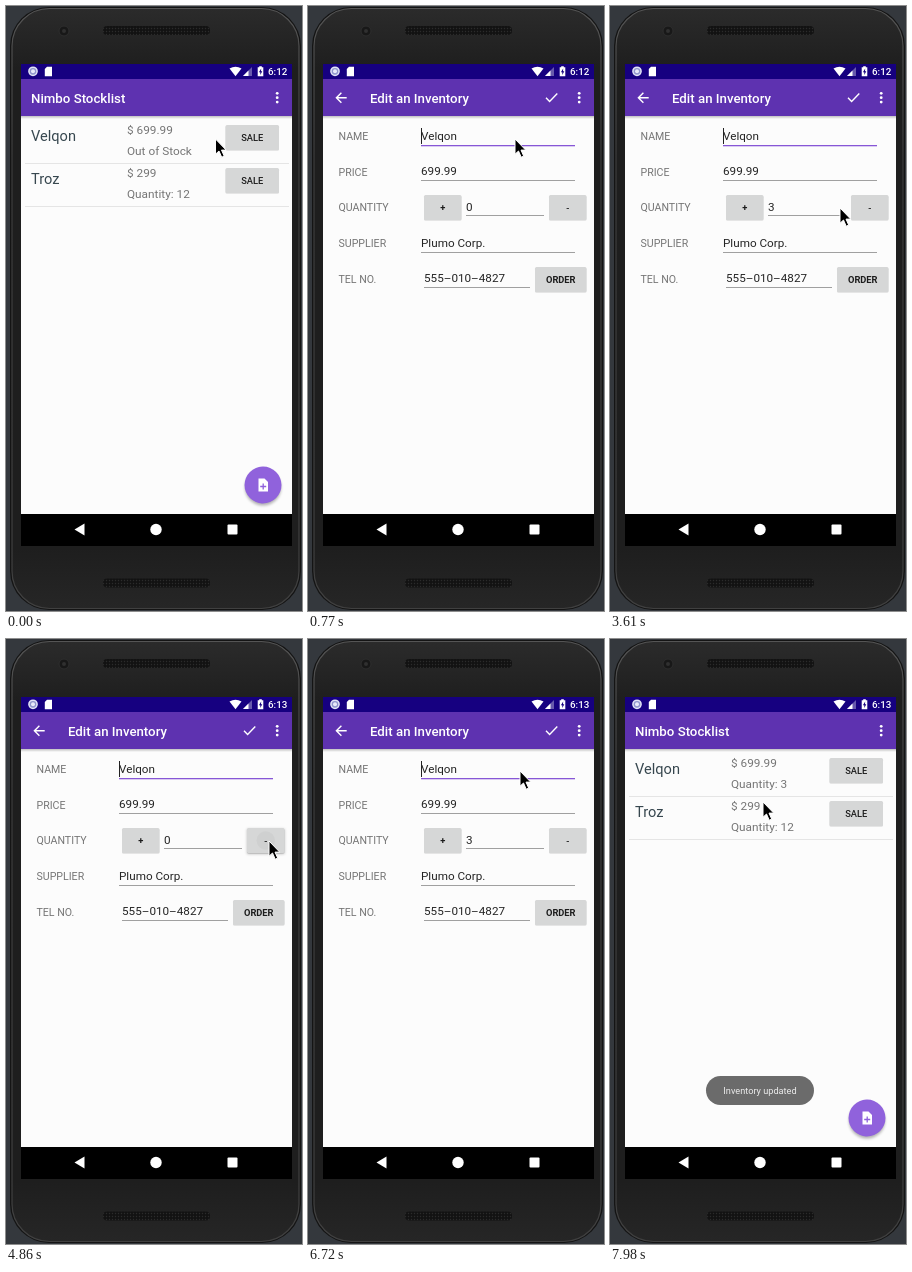
Animation, 296 px wide and 605 px high, one loop 8 s. Source, as an HTML page:

```html
<!DOCTYPE html>
<html lang="en">
<head>
<meta charset="utf-8">
<title>Stock app</title>
<style>
html, body { margin: 0; width: 100%; height: 100%; overflow: hidden; background: #34383d; }
svg { display: block; width: 296px; height: 605px; }
text { font-family: Roboto, "Noto Sans", sans-serif; white-space: pre; }
.med { font-weight: 500; }
</style>
</head>
<body>
<svg id="stage" viewBox="0 0 296 605">
  <defs>
    <linearGradient id="body" x2="0" y2="1">
      <stop offset="0" stop-color="#2b2b2b"/><stop offset=".1" stop-color="#1e1e1e"/>
      <stop offset=".9" stop-color="#1e1e1e"/><stop offset="1" stop-color="#262626"/>
    </linearGradient>
    <linearGradient id="rim" x2="0" y2="1">
      <stop offset="0" stop-color="#555"/><stop offset=".25" stop-color="#3c3c3c"/><stop offset="1" stop-color="#404040"/>
    </linearGradient>
    <linearGradient id="fade" x2="0" y2="1">
      <stop offset="0" stop-color="#000" stop-opacity=".24"/><stop offset="1" stop-color="#000" stop-opacity="0"/>
    </linearGradient>
    <pattern id="mesh" width="3" height="3" patternUnits="userSpaceOnUse">
      <rect width="3" height="3" fill="#121212"/><circle cx="1.5" cy="1.5" r=".7" fill="#2b2b2b"/>
    </pattern>
    <filter id="soft" x="-50%" y="-50%" width="200%" height="200%"><feGaussianBlur stdDeviation="1.6"/></filter>
    <clipPath id="screen"><rect x="15" y="58" width="271" height="482"/></clipPath>
  </defs>
  <rect width="296" height="605" fill="#34383d"/>
  <rect x="4" y="1" width="291" height="603" rx="39" fill="#141414"/>
  <rect x="6" y="2.5" width="287" height="600" rx="37.5" fill="url(#body)" stroke="url(#rim)" stroke-width="1.2"/>
  <circle cx="58" cy="25" r="5" fill="#181818" stroke="#2e2e2e"/>
  <circle cx="58" cy="25" r="2" fill="#303030"/>
  <rect x="97" y="20" width="107" height="9" rx="4" fill="url(#mesh)"/>
  <rect x="97" y="572.5" width="107" height="9" rx="4" fill="url(#mesh)"/>
  <g clip-path="url(#screen)">
    <rect x="15" y="58" width="271" height="482"/>
    <g id="list"></g>
    <g id="nav" fill="#fff">
      <path d="M68.5 523.5 78.5 517.5V529.5Z"/>
      <circle cx="150" cy="523.5" r="5.7"/>
      <rect x="221.5" y="518.5" width="10" height="10" rx="1"/>
    </g>
    <g id="edit"></g>
    <g id="status" fill="#fff">
      <circle cx="27" cy="65.3" r="4.1" fill="#8f95cc" stroke="#e2e4f6" stroke-width="1.5"/>
      <circle cx="27" cy="65.3" r="2" fill="#e8eafa"/>
      <path d="M41 60.7H46V70.3H38.8V63Z"/>
      <path d="M223.5 62.6Q229.5 58.8 235.5 62.6L229.5 70.3Z"/>
      <path d="M246 61V70H237Z" fill-opacity=".35"/>
      <path d="M242.5 64.5V70H237Z"/>
      <path d="M253.2 61.2V60.2H255.8V61.2H257.3V70.2H251.7V61.2Z"/>
      <path d="M255.2 62.5 252.9 66.3H254.3V69L256.3 65.2H255Z" fill="#160080"/>
    </g>
    <g id="toast">
      <rect x="96" y="437" width="108" height="29" rx="14.5" fill="#6b6b6b"/>
    </g>
  </g>
  <path id="mouse" d="M0 0V15.2L3.5 12 6.2 18.2 8.7 17.1 6 11.1H10.7Z" fill="#000" stroke="#fff" stroke-width="1" stroke-linejoin="round"/>
</svg>
<script>
const LOOP = 8000, BLINK_FROM = 1070, BLINK = 485;
const GREY = '#757575', INK = '#242424';
const $ = id => document.getElementById(id);

function add(parent, tag, attrs) {
  const el = document.createElementNS('http://www.w3.org/2000/svg', tag);
  for (const key in attrs) el.setAttribute(key, attrs[key]);
  return parent.appendChild(el);
}
function label(parent, x, y, str, size, fill, more = {}) {
  const el = add(parent, 'text', { x, y, 'font-size': size, fill, ...more });
  el.textContent = str;
  return el;
}
const rect = (parent, x, y, width, height, fill, more = {}) =>
  add(parent, 'rect', { x, y, width, height, fill, ...more });

function button(parent, x, y, w, h, str, bold = 500) {
  rect(parent, x, y + .7, w, h, '#000', { rx: 1.5, opacity: .12 });
  const glow = rect(parent, x, y + 1, w, h, '#000', { filter: 'url(#soft)', opacity: 0 });
  rect(parent, x, y, w, h, '#d6d7d7', { rx: 1.5 });
  const ripple = add(parent, 'circle', { cx: x + w / 2, cy: y + h / 2, r: 10, fill: '#000', opacity: 0 });
  label(parent, x + w / 2, y + h / 2 + 3.2, str, 9.3, '#1c1c1c', { 'text-anchor': 'middle', 'font-weight': bold });
  return { glow, ripple };
}

function page(parent, title, x) {
  rect(parent, 15, 58, 271, 450, '#fcfcfc');
  rect(parent, 15, 110, 271, 3, 'url(#fade)');
  rect(parent, 15, 58, 271, 15, '#160080');
  rect(parent, 15, 73, 271, 37, '#5e32b0');
  label(parent, x, 96.8, title, 13.25, '#fff', { class: 'med' });
  for (const y of [87.3, 91.7, 96.1]) add(parent, 'circle', { cx: 271.2, cy: y, r: 1.4, fill: '#fff' });
}

// List page
const list = $('list');
page(list, 'Nimbo Stocklist', 25);
function row(y, name, price, stock) {
  label(list, 25, y + 25, name, 14.6, '#37474f');
  label(list, 121, y + 18, price, 11.8, GREY);
  const el = label(list, 121, y + 39.3, stock, 11.8, GREY);
  button(list, 219.5, y + 9, 53.5, 25, 'SALE');
  rect(list, 19, y + 47, 264, 1, '#e5e5e5');
  return el;
}
const stock = row(110, 'Velqon', '$ 699.99', 'Out of Stock');
row(153, 'Troz', '$ 299', 'Quantity: 12');
add(list, 'circle', { cx: 257, cy: 481.5, r: 18, opacity: .3, filter: 'url(#soft)' });
add(list, 'circle', { cx: 257, cy: 479, r: 18.5, fill: '#9062dc' });
add(list, 'path', { d: 'M252.5 472.5H258.5L262 476V485.5H252.5Z', fill: '#fff' });
add(list, 'path', { d: 'M257.2 477.5V483.5M254.2 480.5H260.2', stroke: '#9062dc', 'stroke-width': 1.3 });

// Edit page
const edit = $('edit');
page(edit, 'Edit an Inventory', 62);
const tick = add(edit, 'circle', { cx: 244, cy: 92, r: 11, fill: '#fff', opacity: 0 });
const stroke = { fill: 'none', stroke: '#fff', 'stroke-width': 1.4 };
add(edit, 'path', { d: 'M38.7 91.7H28.5M33.4 86.7 28.4 91.7 33.4 96.7', ...stroke });
add(edit, 'path', { d: 'M238 91.8 241.6 95.5 249.3 87.5', ...stroke });
function field(name, y, x, w, value, line = '#a0a0a0', thick = 1) {
  label(edit, 30.5, y, name, 10.6, GREY);
  rect(edit, x, Math.floor(y + 5), w, thick, line);
  return label(edit, x, y - .3, value, 11.7, INK);
}
field('NAME', 134.3, 113, 154, 'Velqon', '#8757d6', 1.3);
field('PRICE', 169.5, 113, 154, '699.99');
const count = field('QUANTITY', 204.9, 158, 78, '0');
field('SUPPLIER', 241, 113, 154, 'Plumo Corp.');
field('TEL NO.', 276.6, 116, 106, '555–010–4827');
const plus = button(edit, 116, 189, 37.5, 25, '+', 700);
const minus = button(edit, 241, 189, 37.5, 25, '-');
button(edit, 227, 261, 51.5, 25, 'ORDER', 600);
const caret = rect(edit, 113, 122, 1, 16, '#222');

const clock = label($('status'), 262, 69.3, '6:12', 9.8, '#fff', { class: 'med' });
label($('toast'), 150, 455, 'Inventory updated', 9.2, '#ececec', { 'text-anchor': 'middle' });

// Pointer: time, x, y
const path = [
  [0, 209.5, 133], [50, 207, 133], [1240, 207, 133], [1450, 158, 186], [1650, 128, 209],
  [1820, 128, 209], [2050, 130, 204], [3300, 130, 204], [3610, 230, 202], [3800, 263, 203],
  [4750, 263, 202], [4960, 263, 202], [5330, 102, 202], [5550, 131, 203], [6190, 131, 203],
  [6560, 212, 132], [6780, 212, 132], [6950, 224, 99], [7180, 235, 87], [7580, 235, 87],
  [7800, 200, 141], [7980, 153, 163], [8000, 153, 163]
];
const quantity = [[2410, 1], [2810, 2], [3010, 3], [3850, 2], [4100, 1], [4350, 0], [5610, 1], [5800, 2], [6000, 3]];
const plusTaps = [2410, 2810, 3010, 5610, 5800, 6000];
const minusTaps = [3850, 4100, 4350, 4810];

const part = (t, from, to) => Math.min(1, Math.max(0, (t - from) / (to - from)));

function pointer(t) {
  const i = path.findIndex(p => p[0] > t), a = path[i - 1], b = path[i];
  const p = part(t, a[0], b[0]), k = p * p * (3 - 2 * p);
  return [a[1] + (b[1] - a[1]) * k, a[2] + (b[2] - a[2]) * k];
}

function press({ glow, ripple }, taps, t) {
  const tap = taps.findLast(s => s - 40 <= t);
  const age = tap === undefined ? 999 : t - tap + 40;
  const power = 1 - part(age, 120, 280);
  glow.setAttribute('opacity', .25 * power);
  ripple.setAttribute('opacity', .03 * power);
  ripple.setAttribute('r', 5 + 7 * part(age, 0, 150));
}

function draw(t) {
  const enter = part(t, 560, 770), leave = part(t, 7450, 7670);
  const shown = leave ? 1 - leave ** 2 : Math.min(1, enter * 1.4);
  const shift = leave ? 36 * leave ** 2.6 : 36 * (1 - enter) ** 2.4;
  edit.setAttribute('transform', `translate(0 ${shift})`);
  edit.setAttribute('opacity', shown);
  list.setAttribute('opacity', leave ? .7 + .3 * leave : 1 - .3 * enter);

  const qty = (quantity.findLast(q => q[0] <= t) || [0, 0])[1];
  count.textContent = qty;
  stock.textContent = t < 7000 ? 'Out of Stock' : 'Quantity: 3';
  clock.textContent = t < 4520 ? '6:12' : '6:13';
  const blinks = Math.floor((t - BLINK_FROM) / BLINK);
  caret.setAttribute('opacity', t < BLINK_FROM || blinks % 2 ? 1 : 0);

  press(plus, plusTaps, t);
  press(minus, minusTaps, t);
  const held = part(t, 7300, 7420);
  tick.setAttribute('opacity', .1 * held);
  tick.setAttribute('r', 6 + 5 * held);
  $('toast').setAttribute('opacity', part(t, 7435, 7645));
  $('mouse').setAttribute('transform', `translate(${pointer(t)})`);
}

const start = performance.now();
function frame() {
  draw((performance.now() - start) % LOOP);
  requestAnimationFrame(frame);
}
draw(0);
frame();
</script>
</body>
</html>
```
